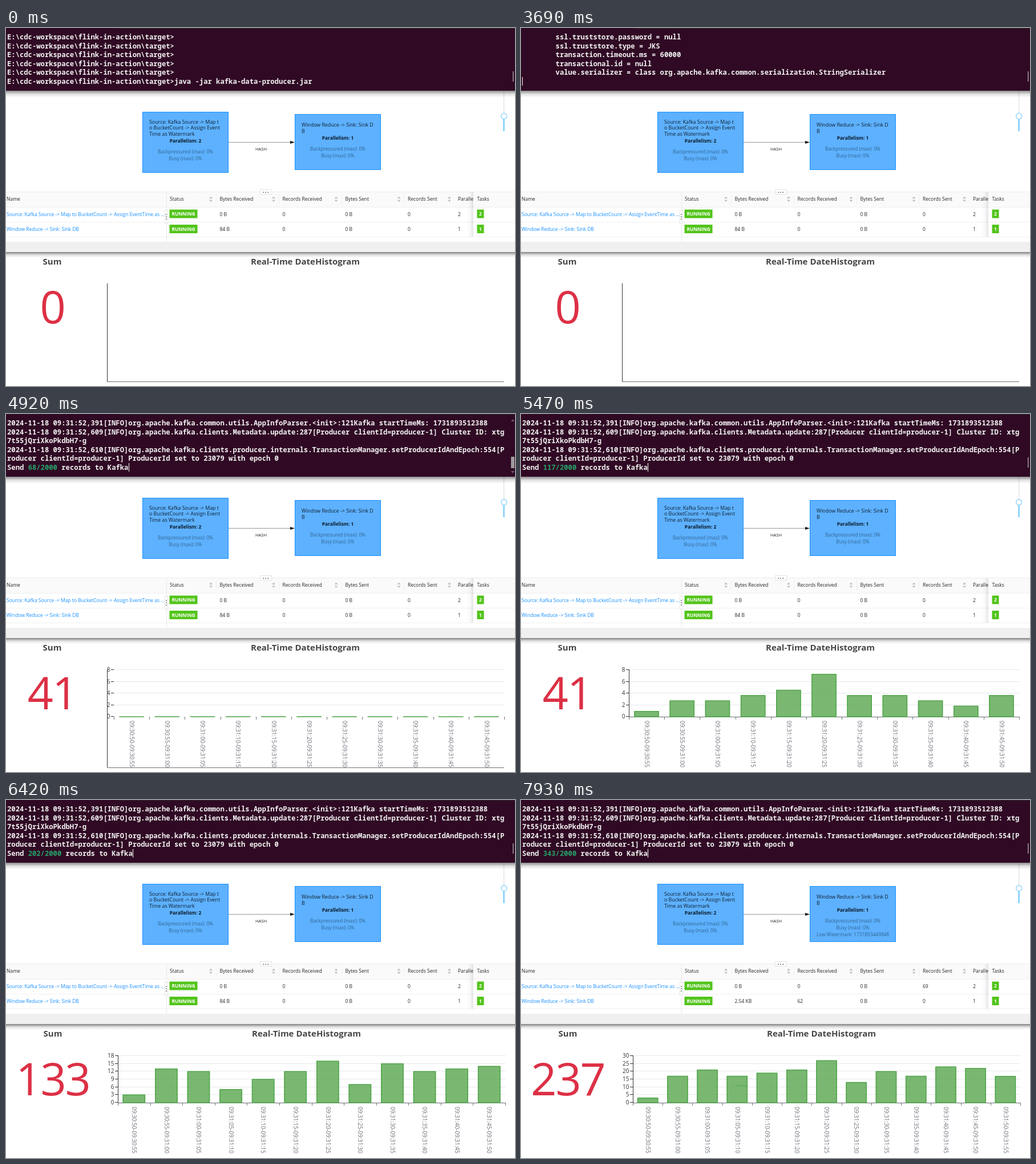
Write an HTML page with a canvas that moves like this. It is 892 by 628 pixels and loops after 8 s.

```html
<!DOCTYPE html>
<html lang="en">
<head>
<meta charset="utf-8">
<title>Streaming demo</title>
<style>
html, body { margin: 0; width: 100%; height: 100%; overflow: hidden; background: #fff; }
canvas { display: block; }
</style>
</head>
<body>
<canvas id="stage" width="892" height="628"></canvas>
<script>
const ctx = document.getElementById('stage').getContext('2d');
const LOOP = 8000;
const UI = '"Open Sans", "Noto Sans", sans-serif';
const MONO = '"Noto Sans Mono", "DejaVu Sans Mono", monospace';
const CELL = 7.33;

const clamp = v => Math.max(0, Math.min(1, v));
const easeOut = v => 1 - (1 - clamp(v)) ** 3;
const lerp = (a, b, f) => a + (b - a) * f;

function rect(x, y, w, h, color) {
  ctx.fillStyle = color;
  ctx.fillRect(x, y, w, h);
}

function line(x1, y1, x2, y2, color, width = 1) {
  ctx.strokeStyle = color;
  ctx.lineWidth = width;
  ctx.beginPath();
  ctx.moveTo(x1, y1);
  ctx.lineTo(x2, y2);
  ctx.stroke();
}

function shape(points, fill, stroke) {
  ctx.beginPath();
  points.forEach(([x, y]) => ctx.lineTo(x, y));
  ctx.closePath();
  ctx.fillStyle = fill;
  ctx.fill();
  if (stroke) {
    ctx.strokeStyle = stroke;
    ctx.lineWidth = 1;
    ctx.stroke();
  }
}

// y is the middle of the capitals
function text(s, x, y, size, color, { weight = 400, align = 'left', family = UI, tracking = 0 } = {}) {
  ctx.font = `${weight} ${size}px ${family}`;
  ctx.letterSpacing = `${tracking}px`;
  ctx.textAlign = align;
  ctx.fillStyle = color;
  ctx.fillText(s, x, y + size * 0.357);
}

function fade(x, y, w, h, alpha, sideways) {
  const g = sideways ? ctx.createLinearGradient(x, 0, x + w, 0) : ctx.createLinearGradient(0, y + h, 0, y);
  g.addColorStop(0, 'rgba(0,0,0,0)');
  g.addColorStop(0.5, `rgba(0,0,0,${alpha * 0.25})`);
  g.addColorStop(1, `rgba(0,0,0,${alpha})`);
  rect(x, y, w, h, g);
}

// ---- terminal ----
const PROMPT = 'E:\\cdc-workspace\\flink-in-action\\target>';
const COMMAND = PROMPT + 'java -jar kafka-data-producer.jar';
const PARSER = 'org.apache.kafka.common.utils.AppInfoParser.<init>:';
const stamp = ms => `2024-11-18 09:31:52,${ms}[INFO]`;
const STARTED = stamp(391) + PARSER + '121Kafka startTimeMs: 1731893512388';
const CONFIG = [
  'ssl.truststore.password = null',
  'ssl.truststore.type = JKS',
  'transaction.timeout.ms = 60000',
  'transactional.id = null',
  'value.serializer = class org.apache.kafka.common.serialization.StringSerializer'
].map(s => ' '.repeat(8) + s);
const LOG = [
  STARTED,
  stamp(609) + 'org.apache.kafka.clients.Metadata.update:287[Producer clientId=producer-1] Cluster ID: xtg',
  '7t55jQriXkoPkdbH7-g',
  stamp(610) + 'org.apache.kafka.clients.producer.internals.TransactionManager.setProducerIdAndEpoch:554[P',
  'roducer clientId=producer-1] ProducerId set to 23079 with epoch 0'
];
const SENT = [[4050, 1], [4920, 68], [6080, 171], [7100, 263], [7930, 343]];

function sentAt(t) {
  const i = Math.max(1, SENT.findIndex(([at]) => t <= at));
  const [[t0, a], [t1, b]] = t > 7930 ? SENT.slice(-2) : SENT.slice(i - 1, i + 1);
  return Math.round(lerp(a, b, (t - t0) / (t1 - t0)));
}

function terminalRows(t, q) {
  const prompts = n => Array(n).fill(PROMPT);
  if (t < 3420) return [...prompts(5), COMMAND];
  if (t < 3690) return [...prompts(4), COMMAND, ''];
  if (t < 3760) return [...CONFIG, ''];
  if (t < 3980) return [CONFIG[4], '',
    stamp(390) + PARSER + '119Kafka version: 2.4.1',
    stamp(391) + PARSER + '120Kafka commitId: c57222ae8cd7866b', STARTED, ''];
  if (t < 4050) return [...LOG, ''];
  return [...LOG, `Send ${sentAt(q)}/2000 records to Kafka`];
}

function drawTerminal(t, q) {
  fade(0, 110, 892, 12, 0.45);
  rect(0, 0, 892, 110, '#300a24');
  rect(198, 0, 694, 1, '#2b2b2b');
  const rows = terminalRows(t, q);
  const put = (s, col, row, color = '#f2f2f2') =>
    text(s, 2 + col * CELL, 16 + row * 15.5, CELL / 0.6, color, { weight: 600, family: MONO });
  rows.forEach((s, row) => {
    const m = /^(Send )(\d+\/2000)(.*)$/.exec(s);
    if (!m) return put(s, 0, row);
    put(m[1], 0, row);
    put(m[2], 5, row, '#26a269');
    put(m[3], 5 + m[2].length, row);
  });
  if (t >= 2010 && !(t >= 2610 && t < 3150)) {
    rect(Math.round(2 + rows[5].length * CELL), 86, 1, 15, '#fff');
  }
  if (t >= 4580 && t < 5190) {
    rect(885, 75, 6, 20, '#9f9a9d');
    shape([[885, 13], [891, 13], [888, 9]], '#6b5a66');
    shape([[885, 100], [891, 100], [888, 104]], '#6b5a66');
  } else {
    rect(888, 76, 1.5, 18, '#a39da1');
  }
}

// ---- job graph and table ----
function drawNode(x, y, h, lines, textY, parallelism, metricY, extra) {
  rect(x, y, 150, h, '#5db1ff');
  ctx.strokeStyle = '#1890ff';
  ctx.lineWidth = 1;
  ctx.strokeRect(x, y, 150, h);
  const mid = x + 75;
  lines.forEach((s, i) => text(s, x + 11.5, textY + i * 10.7, 8.8, '#10202e'));
  text(`Parallelism: ${parallelism}`, mid, metricY - 19, 8.3, '#0c1a26', { weight: 700, align: 'center' });
  ['Backpressured (max): 0%', 'Busy (max): 0%', ...extra].forEach((s, i) =>
    text(s, mid, metricY + i * 12, 8.3, '#33658f', { align: 'center' }));
}

function badge(s, x, y, w) {
  rect(x + 0.5, y - 7.5, w - 1, 15, '#52c41a');
  text(s, x + w / 2, y + 0.5, 8.4, '#fff', { weight: 700, align: 'center' });
}

function drawGraph(fresh) {
  rect(871, 110, 3, 45, '#f0f0f0');
  rect(871, 155, 3, 26, '#91d5ff');
  ctx.beginPath();
  ctx.arc(872.7, 154.8, 5, 0, 7);
  ctx.fillStyle = '#fff';
  ctx.fill();
  ctx.strokeStyle = '#91d5ff';
  ctx.lineWidth = 1.4;
  ctx.stroke();

  line(390, 200.5, 499, 200.5, '#9a9a9a');
  shape([[498, 198], [506, 200.5], [498, 203]], '#111');
  text('HASH', 447, 212, 7.5, '#222', { align: 'center' });
  drawNode(239.5, 147.5, 106,
    ['Source: Kafka Source -> Map t', 'o BucketCount -> Assign Event', 'Time as Watermark'], 164.5, 2, 216.8, []);
  drawNode(506.5, 151.5, 97, ['Window Reduce -> Sink: Sink D', 'B'], 169.8, 1, 212,
    fresh ? ['Low Watermark: 1731893449848'] : []);
}

function drawTable(fresh) {
  const dark = '#262626', link = '#1890ff';
  const columns = [
    ['Status', 287], ['Bytes Received', 374.5, '0 B', fresh ? '2.54 KB' : '84 B'],
    ['Records Received', 484.5, '0', fresh ? '62' : '0'], ['Bytes Sent', 594.5, '0 B', '0 B'],
    ['Records Sent', 704, fresh ? '69' : '0', '0'], ['Parallelism', 792, '2', '1']
  ];
  rect(0, 287, 892, 27, '#fafafa');
  line(0, 287.5, 892, 287.5, '#ececec');
  [314.5, 340.5, 366.5].forEach(y => line(0, y, 892, y, '#f0f0f0'));
  [368, 478, 588, 697].forEach(x => line(x + 0.5, 292, x + 0.5, 309, '#f0f0f0'));
  line(281.5, 288, 281.5, 374, '#e8e8e8');

  text('Name', 1, 300, 8.5, dark);
  text('Source: Kafka Source -> Map to BucketCount -> Assign EventTime as ...', 1, 326.5, 8.5, link);
  text('Window Reduce -> Sink: Sink DB', 1, 352.5, 8.5, link);
  columns.forEach(([head, x, a, b]) => {
    text(head, x, 300, 8.5, dark);
    if (a) {
      text(a, x, 326.5, 8.5, dark);
      text(b, x, 352.5, 8.5, dark);
    }
  });
  [359, 469, 578.5, 688.5, 777].forEach(x => {
    shape([[x - 3, 299], [x + 3, 299], [x, 295.5]], '#bfbfbf');
    shape([[x - 3, 301.5], [x + 3, 301.5], [x, 305]], '#bfbfbf');
  });

  fade(807, 288, 12, 78, 0.1, true);
  rect(819, 288, 73, 26, '#fafafa');
  rect(819, 315, 73, 25, '#fff');
  rect(819, 341, 73, 25, '#fff');
  text('Tasks', 825.5, 300, 8.5, dark);
  [326, 352.5].forEach((y, i) => {
    badge('RUNNING', 286, y, 50);
    badge(String(2 - i), 825, y, 13);
  });

  ctx.fillStyle = '#fff';
  ctx.strokeStyle = '#e4e4e4';
  ctx.lineWidth = 1;
  [[445.5, 283.5, 20, 8], [278.5, 319.5, 5, 23]].forEach(r => {
    ctx.fillRect(...r);
    ctx.strokeRect(...r);
  });
  [-4, 0, 4].forEach(d => {
    rect(454.5 + d, 287.5, 1.5, 1.5, '#444');
    rect(280.3, 330.5 + d, 1.5, 1.5, '#444');
  });

  rect(0, 375, 892, 18, '#f0f0f0');
  fade(0, 393, 892, 10, 0.5);
}

// ---- dashboard ----
const TOP = 449, BASE = 531;
const STATES = [
  { at: 4920, sum: 41, max: 8, step: 2, left: 191, cats: [0, 1, 2, 4, 5, 6, 7, 8, 9, 10, 11],
    values: [1, 3, 3, 4, 5, 8, 4, 4, 3, 2, 4] },
  { at: 6075, sum: 133, max: 18, step: 3, left: 196,
    values: [3, 13, 12, 7, 9, 12, 16, 7, 15, 12, 13, 14] },
  { at: 7101, sum: 237, max: 30, step: 5, left: 196,
    values: [3, 17, 21, 17, 19, 21, 27, 13, 20, 17, 23, 22, 17] }
];
for (const s of STATES) {
  s.cats = s.cats || s.values.map((_, i) => i);
  s.band = (875 - s.left) / s.values.length;
  s.edge = i => s.left + s.band * i;
  s.y = v => BASE - (BASE - TOP) * v / s.max;
}

function clock(slot) {
  const sec = 30 * 60 + 50 + slot * 5;
  const two = n => String(n).padStart(2, '0');
  return `09:${two(Math.floor(sec / 60))}:${two(sec % 60)}`;
}

function drawBar(x, y, w) {
  rect(x, y, w, BASE - y, 'rgba(85,165,75,0.78)');
  ctx.strokeStyle = '#4fa548';
  ctx.lineWidth = 1.5;
  ctx.strokeRect(x + 0.75, y, w - 1.5, BASE - y);
}

function drawChart(cur, prev, q) {
  const move = easeOut((q - cur.at) / 300);
  const grow = easeOut((q - cur.at) / 1000);
  const left = prev ? lerp(prev.left, cur.left, move) : cur.left;
  const edge = i => prev && i <= prev.values.length ? lerp(prev.edge(i), cur.edge(i), move) : cur.edge(i);
  const center = i => prev && i < prev.values.length
    ? lerp(prev.edge(i + 0.5), cur.edge(i + 0.5), move) : cur.edge(i + 0.5);

  for (let v = 0; v <= cur.max; v += cur.step) {
    const kept = prev && v <= prev.max && v % prev.step === 0;
    const y = Math.round(kept ? lerp(prev.y(v), cur.y(v), move) : cur.y(v)) - 0.5;
    if (v) line(left, y, 875, y, '#e6e8ee');
    line(cur.left - 5, y, cur.left, y, '#333');
    text(String(v), cur.left - 6.5, y - 0.5, 10, '#333', { align: 'right' });
  }

  // the bare axes slide into their new place when the first data arrives
  const axisX = prev ? left : lerp(179, left, move);
  const axisY = prev ? 531 : lerp(620, 531, move);
  line(Math.round(axisX) + 0.5, TOP - 1, Math.round(axisX) + 0.5, axisY, '#333');
  line(axisX, Math.round(axisY) + 0.5, 875, Math.round(axisY) + 0.5, '#6e7079');

  for (let i = 0; i <= cur.values.length; i++) {
    const x = Math.round(edge(i)) + 0.5;
    line(x, 531, x, 536, '#6e7079');
  }

  cur.cats.forEach((cat, i) => {
    const was = prev ? prev.cats.indexOf(cat) : -1;
    const x = cur.edge(i + 0.15), w = cur.band * 0.7, y = cur.y(cur.values[i]);
    if (was < 0) drawBar(x, lerp(BASE, y, grow), w);
    else drawBar(lerp(prev.edge(was + 0.15), x, move), lerp(prev.y(prev.values[was]), y, move),
      lerp(prev.band * 0.7, w, move));

    ctx.save();
    ctx.translate(center(i) + 0.3, 538);
    ctx.rotate(Math.PI / 2);
    text(`${clock(cat)}-${clock(cat + 1)}`, 0, 0, 9.95, '#6e7079');
    ctx.restore();
  });
  if (cur.max === 30) rect(377, 500.5, 19, 1, '#4fa548');
}

function drawDashboard(q) {
  const n = STATES.filter(s => q >= s.at).length;
  const cur = STATES[n - 1];
  ctx.save();
  if (n < 2) ctx.translate(-2, 0);
  const nudge = n < 2 ? 1 : 0;
  text('Sum', 82 + nudge, 410, 15, '#464646', { weight: 700, align: 'center' });
  text('Real-Time DateHistogram', 526.5, 410, 15, '#464646', { weight: 700, align: 'center' });
  text(String(cur ? cur.sum : 0), 82 + nudge, 489.5, 79, '#dc3045', { align: 'center', tracking: -2 });
  if (cur) {
    drawChart(cur, STATES[n - 2], q);
  } else {
    line(179.5, 448, 179.5, 621, '#333');
    line(179, 620.5, 875, 620.5, '#6e7079');
  }
  ctx.restore();
}

// ---- pointer ----
function drawPointer(t) {
  if (t < 1180 || t >= 3490) return;
  const f = easeOut((Math.floor((t - 1180) / 69) + 1) / 12);
  const x = lerp(892, 721, f), y = lerp(545, 91.5, f);
  const outline = [[0, 0], [0, 12], [2.8, 9.5], [4.7, 14], [6.8, 13], [4.9, 8.8], [8.6, 8.6]];
  shape(outline.map(([dx, dy]) => [x + dx, y + dy]), '#fff', '#111');
}

function draw(t) {
  const q = 4510 + Math.floor((t - 4510) / 68.4 + 0.2) * 68.4;
  const fresh = t >= 7450;
  rect(0, 0, 892, 628, '#fff');
  drawDashboard(q);
  drawGraph(fresh);
  drawTable(fresh);
  drawTerminal(t, q);
  drawPointer(t);
}

function frame() {
  draw(performance.now() % LOOP);
  requestAnimationFrame(frame);
}
frame();
</script>
</body>
</html>
```
